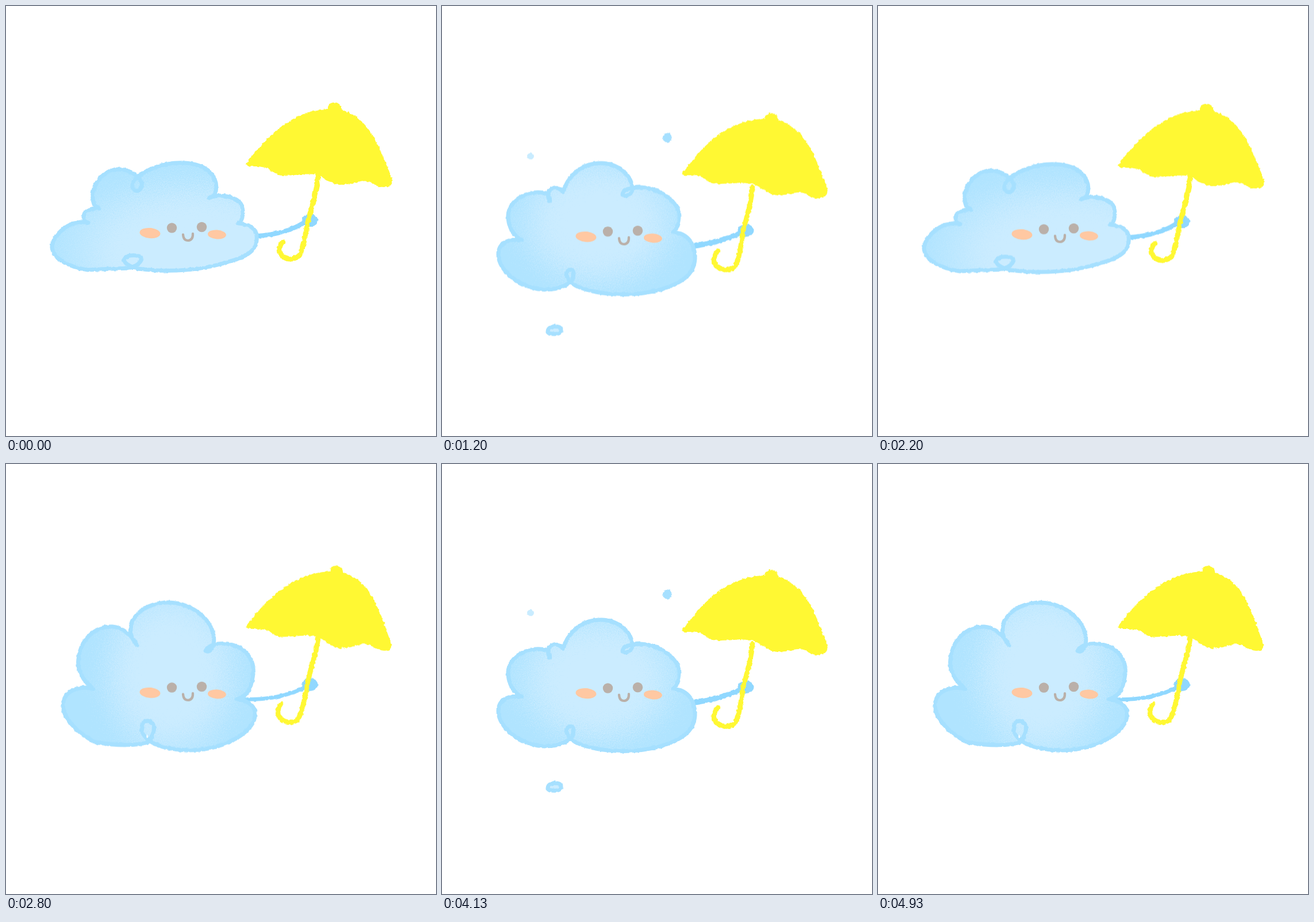
Animation, 748 px wide and 748 px high, one loop 4.99 s. Source, as an HTML page:

```html
<!DOCTYPE html>
<html lang="en">
<head>
<meta charset="utf-8">
<title>Cloud with umbrella</title>
<style>
html, body { margin: 0; width: 100%; height: 100%; overflow: hidden; background: #fff; }
svg { position: absolute; left: 0; top: 0; width: 748px; height: 748px; }
.pose { opacity: 0; will-change: transform, opacity; }
.line { fill: none; stroke: #a6e0ff; stroke-width: 7; stroke-linecap: round; stroke-linejoin: round; }
.arm { fill: none; stroke: #90d8ff; stroke-linecap: round; }
.pole { fill: none; stroke: #fff833; stroke-width: 8.5; stroke-linecap: round; }
</style>
</head>
<body>
<script>
const SIZE = 748, LOOP = 4990, STEP = 1000 / 15, CYCLE = 720;

// base: bob height the pose is drawn at; glow: centre and radii of the light area
const poses = [
  {
    base: 0, glow: [325, 428, 275, 160], hand: 373, armWidth: 8,
    arm: 'M438 400 Q486 397 518 377',
    cloud: `M217 456 Q180 457 142 459 C112 455 82 440 80 420 C80 400 110 370 143 377
      C128 371 134 350 162 352 L154 347 C142 320 165 285 195 284 C215 284 230 295 236 307
      C238 318 230 323 224 321 C216 316 220 302 232 295 C260 275 300 268 330 276
      C365 285 372 315 361 330 L353 334 C375 325 408 333 411 350 C414 365 410 375 404 378
      C430 380 438 392 436 408 C434 432 405 440 380 447 C330 462 280 463 230 457
      C212 453 203 445 206 439 C213 431 237 433 236 440 C234 448 224 453 217 456Z`,
    pole: `M543 296 C540 328 529 355 524 380 C519 410 515 430 508 436
      C496 445 475 440 476 421 Q478 413 482 410`,
    canopy: `M420 271 C455 225 500 181 560 179 C558 164 586 164 584 180
      C630 195 648 238 671 300 C675 318 652 318 640 310 C620 297 608 311 580 311
      C560 309 555 297 537 293 C515 291 490 297 473 294 C462 290 460 281 445 280
      C432 277 422 282 418 275Z`
  },
  {
    base: 4, glow: [272, 376, 172, 140], hand: 388, armWidth: 9,
    arm: 'M440 415 Q482 409 518 393',
    cloud: `M228 464 C232 480 205 491 178 491 C140 490 98 460 98 430 C98 408 118 402 138 405
      C122 395 115 380 115 362 C116 335 150 315 185 324 L187 337 C178 318 195 305 211 321
      C220 290 245 271 277 271 C305 271 332 292 331 318 C328 327 316 331 314 325
      C314 317 330 313 345 313 C380 314 414 340 413 365 C412 378 408 387 402 391
      C430 393 441 415 440 438 C438 466 416 480 380 491 C330 505 265 501 228 482
      C214 470 214 459 221 457 C228 455 229 460 228 464Z`,
    pole: `M540 313 C538 345 528 368 523 393 C519 424 515 446 508 452
      C496 461 472 456 473 438 Q475 428 480 424`,
    canopy: `M420 286 C457 237 498 195 562 194 C560 180 586 180 585 196
      C634 211 648 258 670 314 C675 333 652 336 638 328 C620 315 608 327 583 327
      C562 325 553 309 537 307 C515 303 490 309 470 306 C458 301 455 293 440 293
      C430 290 422 295 418 289Z`,
    extra: `<path d="M384 226 Q386 219 392 218 Q399 219 400 228 Q399 234 392 235 Q384 234 384 226Z" fill="#a6e0ff"/>
      <ellipse cx="154" cy="259" rx="6" ry="5.5" fill="#c9ecff"/>
      <path d="M184 565 Q184 556 196 555 Q209 555 207 563 Q205 569 193 568 Q186 568 184 565Z" fill="#cbecff" stroke="#a6e0ff" stroke-width="7"/>`
  },
  {
    base: 3, glow: [286, 364, 150, 185], hand: 384, armWidth: 6.5,
    arm: 'M404 409 Q470 413 520 389',
    cloud: `M247 484 C230 490 195 491 155 484 C120 466 99 440 99 420 C100 395 125 385 152 391
      C130 375 124 355 126 340 C130 300 160 282 185 283 C200 284 218 295 228 316 L219 302
      C208 265 245 241 282 241 C325 241 368 275 361 315 C358 325 352 328 347 325
      C350 315 370 311 385 313 C415 317 433 340 430 365 C427 390 420 405 402 409
      C425 412 436 425 433 440 C428 470 375 499 315 498 C285 497 262 491 247 480
      C230 465 235 448 246 447 C260 448 262 465 247 484Z`,
    pole: `M543 303 C540 332 528 358 524 385 C518 415 514 438 506 446
      C494 453 472 448 473 430 Q475 420 479 418`,
    canopy: `M420 279 C455 233 500 190 564 187 C560 174 588 174 587 189
      C634 206 644 240 671 313 C674 329 652 327 637 318 C622 306 608 321 580 321
      C560 318 555 303 537 300 C515 296 490 303 473 300 C462 297 460 288 445 288
      C432 285 422 290 418 283Z`,
    extra: '<ellipse cx="246" cy="474" rx="1.6" ry="3" fill="#fff"/>'
  }
];

const region = `x="0" y="0" width="${SIZE}" height="${SIZE}" filterUnits="userSpaceOnUse" color-interpolation-filters="sRGB"`;
const noise = (id, freq, scale, seed) => `<filter id="${id}" ${region}>
  <feTurbulence type="fractalNoise" baseFrequency="${freq}" numOctaves="2" seed="${seed}" result="n"/>
  <feDisplacementMap in="SourceGraphic" in2="n" scale="${scale}" xChannelSelector="R" yChannelSelector="G"/>
</filter>`;

const face = y => `<g transform="translate(0 ${y})">
  <ellipse cx="250.5" cy="395" rx="18" ry="9" transform="rotate(5 250 395)" fill="#ffc8a2"/>
  <ellipse cx="367" cy="397.5" rx="16" ry="8" transform="rotate(4 367 397)" fill="#ffc8a2"/>
  <g fill="#bab0a9"><circle cx="288.5" cy="386" r="8.7"/><circle cx="340.5" cy="384.5" r="8.7"/></g>
  <path d="M308 397.500 Q308.500 408 317 408 Q325.500 407 325 396" fill="none" stroke="#bab0a9" stroke-width="4.2" stroke-linecap="round"/>
</g>`;

function draw(p, i) {
  const [cx, cy, rx, ry] = p.glow;
  return `<svg class="pose" viewBox="0 0 ${SIZE} ${SIZE}">
    <defs>
      ${noise('rough' + i, 0.19, 5, 4 + i)}
      ${noise('soft' + i, 0.16, 3.5, 9 + i)}
      ${noise('grain' + i, 0.7, 120, 2 + i)}
      <radialGradient id="glow${i}" gradientUnits="userSpaceOnUse" cx="0" cy="0" r="1"
        gradientTransform="translate(${cx} ${cy}) scale(${rx} ${ry})">
        <stop offset=".5" stop-color="#cbecff"/><stop offset=".92" stop-color="#b0e4ff"/>
      </radialGradient>
      <clipPath id="clip${i}"><path d="${p.cloud}"/></clipPath>
    </defs>
    <path class="arm" d="${p.arm}" stroke-width="${p.armWidth}" filter="url(#soft${i})"/>
    <g clip-path="url(#clip${i})">
      <rect width="${SIZE}" height="${SIZE}" fill="url(#glow${i})" filter="url(#grain${i})"/>
    </g>
    <g filter="url(#soft${i})">
      <path class="line" d="${p.cloud}"/>
      ${p.extra || ''}
      <ellipse cx="528.5" cy="${p.hand}" rx="14" ry="11" fill="#90d8ff"/>
    </g>
    ${face(p.base)}
    <g filter="url(#rough${i})">
      <path class="pole" d="${p.pole}"/>
      <path d="${p.canopy}" fill="#fff833"/>
    </g>
  </svg>`;
}

document.body.innerHTML = poses.map(draw).join('');
const layers = [...document.querySelectorAll('.pose')];

// Phase of the bounce and how far everything sinks
const bob = [[0, 0], [.04, 0], [.056, 2.4], [.185, 5], [.5, 11], [.59, 13],
  [.665, 6.4], [.72, 4], [.75, 4], [.852, 3], [.95, 2.4], [.98, 2], [1, 0]];
// Phase at which each pose begins
const beats = [[0, 0], [.25, 2], [.5, 1], [.78, 2], [.95, 0]];

function sink(phase) {
  const k = bob.findIndex(b => b[0] > phase);
  const [p0, y0] = bob[k - 1], [p1, y1] = bob[k];
  return y0 + (y1 - y0) * (phase - p0) / (p1 - p0);
}

const start = performance.now();
function tick() {
  const t = Math.floor((performance.now() - start) % LOOP / 10) * 10;
  const step = Math.floor((t + 5) / STEP);
  const phase = step * STEP / CYCLE % 1;
  const active = beats.filter(b => b[0] <= phase).pop()[1];
  const y = sink(phase);
  layers.forEach((el, i) => {
    el.style.opacity = i === active ? 1 : 0;
    el.style.transform = `translateY(${(y - poses[i].base).toFixed(2)}px)`;
  });
  requestAnimationFrame(tick);
}
tick();
</script>
</body>
</html>
```
